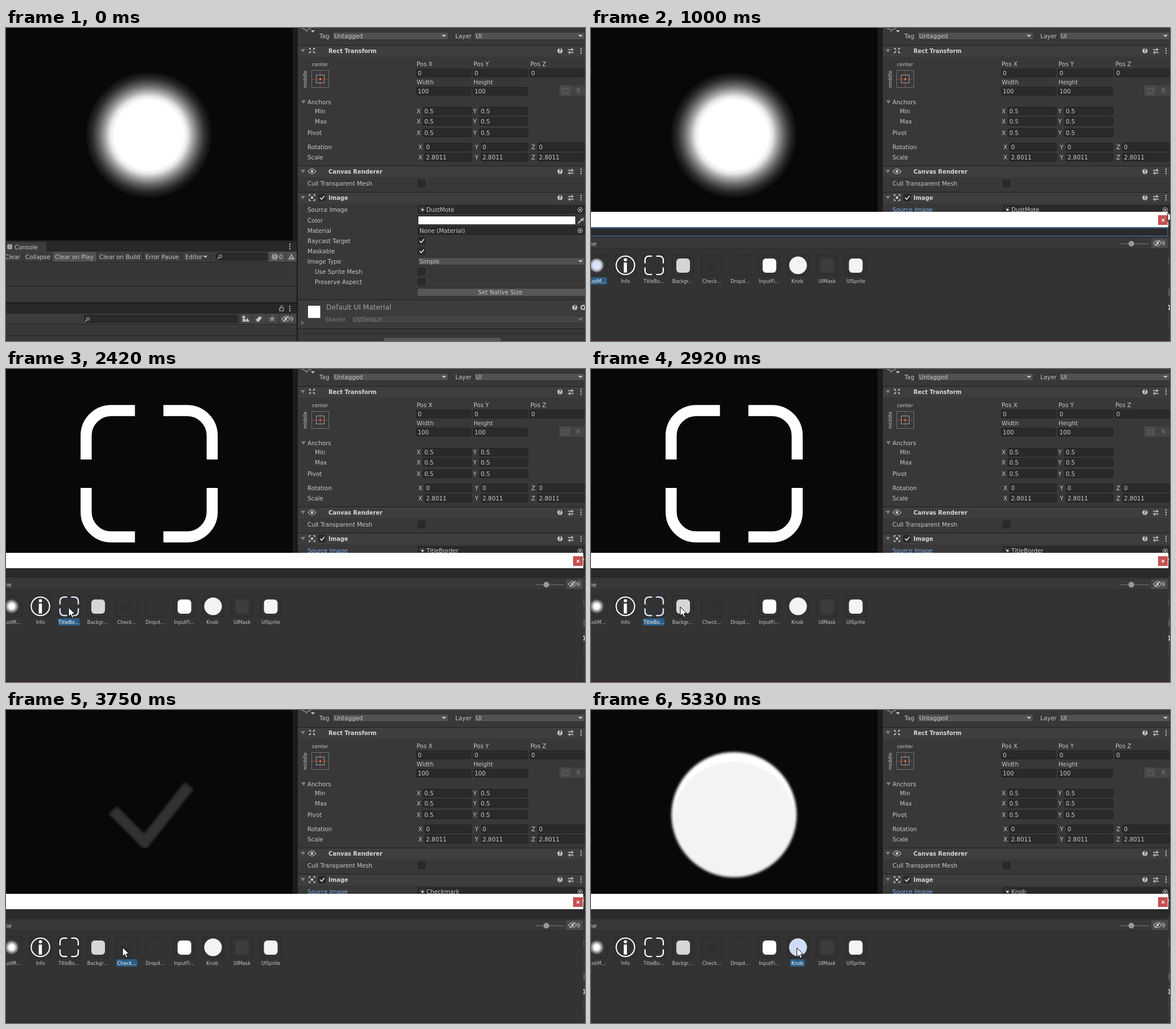
An HTML page for the animation above (5.41 s loop, 1018 by 550 pixels).

```html
<!DOCTYPE html>
<html lang="en">
<head>
<meta charset="utf-8">
<title>Sprite picker</title>
<style>
html, body { margin: 0; width: 100%; height: 100%; overflow: hidden; background: #383838; }
svg { display: block; width: 1018px; height: 550px; }
text { font: 10.3px "DejaVu Sans", sans-serif; fill: #c8c8c8; white-space: pre; }
.b { font-weight: bold; font-size: 9.9px; fill: #d6d6d6; }
.s { font-size: 8.8px; }
.c { font-size: 8.3px; text-anchor: middle; }
.m { text-anchor: middle; }
.big { font-size: 12.2px; fill: #a2a2a2; }
.dim { fill: #7a7a7a; }
.blue { fill: #7fadee; }
.on { fill: #fff; }
.state, .pop, .lower { animation: 5410ms step-end infinite; }
.pop { animation-name: pop; }
.lower { animation-name: lower; }
.cursor { animation: cursor 5410ms step-end infinite; }
@keyframes pop { 0% { opacity: 0 } 12.2%, 100% { opacity: 1 } }
@keyframes lower {
  0% { transform: translateY(0) }
  44.55% { transform: translateY(-18px) }
  69.2% { transform: translateY(4px) }
  81.5% { transform: translateY(-14px) }
  93.8%, 100% { transform: translateY(4px) }
}
@keyframes cursor {
  0% { transform: translate(1040px, 352px) }
  1.4% { transform: translate(1016px, 354px); animation-timing-function: steps(6) }
  10.65% { transform: translate(1015px, 326px) }
  12.2% { transform: translate(1014px, 324px) }
  18.35% { transform: translate(1014px, 324px); animation-timing-function: steps(2) }
  21.4% { transform: translate(477px, 456px); animation-timing-function: steps(6) }
  30.65% { transform: translate(64px, 422px) }
  33.75% { transform: translate(62px, 422px); animation-timing-function: steps(5) }
  41.45% { transform: translate(110px, 419px) }
  44.55% { transform: translate(110px, 419px); animation-timing-function: steps(4) }
  50.7% { transform: translate(157px, 418px) }
  56.85% { transform: translate(157px, 418px); animation-timing-function: steps(5) }
  64.55% { transform: translate(205px, 417px) }
  69.2% { transform: translate(205px, 417px); animation-timing-function: steps(8) }
  81.5% { transform: translate(302px, 421px); animation-timing-function: steps(8) }
  93.8% { transform: translate(353px, 420px); animation-timing-function: steps(3) }
  98.45%, 100% { transform: translate(362px, 418px) }
}
</style>
</head>
<body>
<svg id="stage" viewBox="0 0 1018 550"></svg>
<script>
const rect = (x, y, w, h, fill, more = '') =>
  `<rect x="${x}" y="${y}" width="${w}" height="${h}" fill="${fill}" ${more}/>`;
const circ = (x, y, r, fill, more = '') =>
  `<circle cx="${x}" cy="${y}" r="${r}" fill="${fill}" ${more}/>`;
const path = (d, fill, more = '') => `<path d="${d}" fill="${fill}" ${more}/>`;
const line = (d, color = '#c4c4c4', w = 1) => path(d, 'none', `stroke="${color}" stroke-width="${w}"`);
const text = (x, y, str, cls = '') => `<text x="${x}" y="${y + 3.8}" class="${cls}">${str}</text>`;
const group = (cls, body) => `<g class="${cls}">${body}</g>`;

// Editor widgets; y is the middle of the row
const field = (x, y, w, str = '') =>
  rect(x + .5, y - 7, w - 1, 14, '#2a2a2a', 'stroke="#202020" rx="2"') + text(x + 3, y, str);
const drop = (x, y, w, str, cls = '', fill = '#515151') =>
  rect(x + .5, y - 6.5, w - 1, 13, fill, 'stroke="#303030" rx="2"') + text(x + 3, y, str, cls) +
  path(`M${x + w - 12} ${y - 2}h8l-4 4z`, cls ? '#777' : '#c4c4c4');
const check = (x, y, on) =>
  rect(x + .5, y - 6, 12, 12, '#2a2a2a', 'stroke="#202020" rx="2"') +
  (on ? line(`M${x + 3} ${y}l3 3 5-6`, '#e0e0e0', 1.7) : '');
const fold = (x, y, fill = '#7d7d7d') => path(`M${x} ${y - 3}h8l-4 6z`, fill);
const dots = (x, y) => [-4, 0, 4].map(d => circ(x, y + d, 1.2, '#c4c4c4')).join('');
const help = (x, y) => circ(x, y, 4.6, '#c4c4c4') +
  `<text x="${x}" y="${y + 3}" class="c b" style="fill:#383838;font-size:8px">?</text>`;
const sliders = (x, y) => line(`M${x - 5} ${y - 2}h10M${x - 5} ${y + 3}h10M${x + 2} ${y - 5}v6M${x - 2} ${y}v6`, '#c4c4c4', 1.3);
const lens = (x, y) => circ(x, y, 2.4, 'none', 'stroke="#c4c4c4"') + line(`M${x - 2} ${y + 2}l-3 3`, '#c4c4c4', 1.3);
const eye = (x, y, off) => path(`M${x - 7} ${y}q7-9 14 0q-7 9-14 0z`, 'none', 'stroke="#c4c4c4" stroke-width="1.2"') +
  circ(x, y, 2.4, '#c4c4c4') + (off ? line(`M${x - 5} ${y + 5}l10-10`, '#c4c4c4', 1.4) : '');
const head = (y, title, tx = 567) => rect(513, y - 10, 505, 20, '#3e3e3e') + rect(513, y - 10, 505, 1, '#1f1f1f') +
  fold(518, y) + text(tx, y, title, 'b') + help(974, y) + sliders(993, y) + dots(1011, y);
const pair = (y, x, w, vals) => vals.map((v, i) => {
  const px = x + i * 99.3;
  return text(px, y, 'XYZ'[i]) + field(px + 10.5, y, w, v);
}).join('');
const frame = (x, y) => line(`M${x} ${y + 3}v-3h3m4 0h3v3m0 4v3h-3m-4 0h-3v-3`, '#c4c4c4', 1.3) +
  rect(x + 3, y + 3, 4, 4, '#c4c4c4');

// Sprites in unit scale: 241 px square centred on 0,0
const brackets = (x, y, s, w, color) => `<g transform="translate(${x} ${y}) scale(${s})">` +
  ['1 1', '-1 1', '1 -1', '-1 -1'].map(k =>
    `<path transform="scale(${k})" d="M-110.8-25V-67a44 44 0 0 1 44-44H-25" fill="none" stroke="${color}" stroke-width="${w}"/>`).join('') + '</g>';
const info = (x, y, s, color) => `<g transform="translate(${x} ${y}) scale(${s})">` +
  circ(0, 0, 115.7, 'none', `stroke="${color}" stroke-width="${s < 1 ? 15 : 10}"`) +
  `<ellipse cy="-69.5" rx="21" ry="20" fill="${color}"/>` + rect(-20.5, -35, 39.5, 126, color) + '</g>';
const panel = fill => rect(128.5, 61, 247, 246, fill, 'rx="9" stroke="#8c8c8c" stroke-width="1.4"');

const sprites = [
  circ(251, 188, 110, 'url(#glow)'),
  info(251.5, 184, 1, '#fff'),
  brackets(251.7, 184, 1, 19.5, '#fff'),
  panel('#cfcfcf'),
  path('M188 176L244 232L322 133', 'none', 'stroke="#303030" stroke-width="20" filter="url(#soft)"'),
  panel('#fff') + rect(133, 61.5, 238, 1.5, '#c4c4c4', 'rx="1"'),
  `<g filter="url(#soft)">${circ(251.5, 184, 110, '#fff')}<ellipse cx="251.5" cy="192" rx="107" ry="101" fill="#f3f3f3"/></g>`
];

const tile = (x, fill) => rect(x - 12, 405, 24, 25, fill, 'rx="6"');
const thumbs = [
  c => circ(10, 417, 13, c ? 'url(#moteBlue)' : 'url(#mote)'),
  c => info(60.5, 417, .14, c || '#fff'),
  c => brackets(111, 417, .145, 16, c || '#fff'),
  c => tile(162, c || '#d6d6d6'),
  () => line('M204 416l7 7 10-13', '#2c2c2c', 2.5),
  c => tile(313.7, c || '#fff'),
  c => circ(364, 417, 15.5, c || '#f3f3f3')
];
const names = ['DustMote', 'Info', 'TitleBorder', 'Background', 'Checkmark', 'InputFieldBackground', 'Knob'];
const labels = [[9, 'DustM...', 38], [60.5, 'Info', 21], [110.5, 'TitleBo...', 38], [160.7, 'Backgr...', 39],
  [212.5, 'Check...', 37], [313.3, 'InputFi...', 41], [362.8, 'Knob', 26],
  [262, 'Dropd...', 0], [415, 'UIMask', 0], [465.5, 'UISprite', 0]];

// One visibility window per chosen sprite, in percent of the loop
const cuts = [0, 33.75, 44.55, 56.85, 69.2, 81.5, 93.8];
const css = cuts.map((from, i) => {
  const to = cuts[i + 1];
  return `@keyframes pick${i}{${i ? '0%{opacity:0}' : ''}${from}%{opacity:1}` +
    (to ? `${to}%,100%{opacity:0}}` : '100%{opacity:1}}') + `.pick${i}{animation-name:pick${i}}`;
}).join('\n');
document.head.appendChild(document.createElement('style')).textContent = css;

const stops = list => list.map(([o, c]) => `<stop offset="${o}" stop-color="${c}"/>`).join('');
const mote = (id, c) => `<radialGradient id="${id}"><stop offset=".35" stop-color="${c}"/><stop offset="1" stop-color="${c}" stop-opacity="0"/></radialGradient>`;
const defs = `<defs><radialGradient id="glow">${stops([[.55, '#fff'], [.62, '#e6e6e6'], [.7, '#a6a6a6'],
  [.8, '#626262'], [.9, '#2c2c2c'], [.98, '#121212'], [1, '#141414']])}</radialGradient>
  ${mote('mote', '#fff')}${mote('moteBlue', '#dbe7ff')}
  <filter id="soft"><feGaussianBlur stdDeviation="2"/></filter></defs>`;

const game = rect(0, 0, 511, 375, '#1c1c1c') + rect(0, 0, 504, 373, '#080808');

const consolePane = rect(0, 374, 511, 19, '#282828') + rect(0, 376, 71, 17, '#3c3c3c') +
  rect(2.5, 380.5, 8, 8, '#c4c4c4', 'rx="1"') + line('M4 383h5M4 386h5', '#383838') + text(15, 385, 'Console') + dots(499, 384) +
  rect(0, 393, 511, 18, '#3c3c3c') + rect(82, 393, 77, 18, '#505050') +
  [29, 81, 159, 241, 309, 359].map(x => rect(x, 393, 1, 18, '#2a2a2a')).join('') +
  [[-2, 'Clear'], [34, 'Collapse'], [86, 'Clear on Play'], [164, 'Clear on Build'], [245, 'Error Pause'], [315, 'Editor']]
    .map(([x, s]) => text(x, 402, s)).join('') + path('M347 400h7l-3.5 4z', '#c4c4c4') +
  rect(369.5, 395.5, 90, 13, '#2a2a2a', 'rx="4" stroke="#202020"') + lens(377, 401) +
  rect(462, 393, 29, 18, '#505050') + rect(493, 393, 18, 18, '#505050') +
  circ(472.5, 402, 5.5, '#9a9a9a') + line('M472.5 398.5v4m0 1.5v1.5', '#505050', 1.6) + text(480, 402, '0') +
  path('M502 396l6 11h-12z', '#9a9a9a') + line('M502 400v4m0 1v1', '#505050', 1.3) +
  rect(0, 411, 511, 43, '#373737') + rect(0, 411, 511, 1, '#232323') + rect(0, 453, 511, 1, '#202020') +
  rect(0, 482, 511, 20, '#282828') + rect(0, 482, 511, 2, '#191919') +
  rect(481, 492, 7, 5, 'none', 'stroke="#c4c4c4"') + line('M483 492v-2a2 2 0 0 1 4 0', '#c4c4c4') + dots(499, 493) +
  rect(0, 502, 511, 18, '#3c3c3c') + rect(137.5, 504.5, 270, 13, '#2a2a2a', 'rx="4" stroke="#202020"') + lens(144, 511) +
  rect(411, 502, 99, 18, '#464646') + [411, 433, 456, 480].map(x => rect(x, 502, 1, 18, '#303030')).join('') +
  circ(418, 508, 2.5, '#c4c4c4') + rect(416, 511, 5, 5, '#c4c4c4') + path('M424 509l4 7h-7z', '#c4c4c4') +
  path('M439 513l6-6h4v4l-6 6z', '#c4c4c4') +
  path('M468 505l1.6 4 4.3.2-3.4 2.6 1.2 4.2-3.7-2.4-3.7 2.4 1.2-4.2-3.4-2.6 4.3-.2z', '#8c8c8c') +
  eye(492, 511, true) + text(499, 511, '9') +
  rect(0, 520, 511, 1, '#232323') + rect(0, 540, 511, 1, '#232323');

const transform = line('M520 0l8 4 9-4m-9 4v3', '#9a9a9a', 1.3) + path('M536 4h7l-3.5 4z', '#c4c4c4') +
  text(551, 14, 'Tag') + drop(574, 14, 204, 'Untagged') + text(790, 14, 'Layer') + drop(823, 14, 195, 'UI') +
  head(40, 'Rect Transform') + line('M533 35l3 3m4 0l3-3m-10 9l3-3m4 0l3 3', '#c4c4c4', 2) +
  text(538, 63, 'center', 's') + '<text transform="translate(529 105) rotate(-90)" class="s">middle</text>' +
  rect(537.5, 74.5, 30, 30, 'none', 'stroke="#707070"') + line('M552.5 75v30M538 90h30', '#9c3c38') +
  rect(545.5, 82.5, 14, 14, 'none', 'stroke="#a0a0a0"') + circ(552.5, 90, 1.6, '#f08a3c') +
  ['X', 'Y', 'Z'].map((s, i) => text(722 + 100 * i, 63, 'Pos ' + s) + field(721 + 99.7 * i, 79, 97, '0')).join('') +
  text(722, 95, 'Width') + text(822, 95, 'Height') + field(721, 111, 97, '100') + field(820.7, 111, 97, '100') +
  rect(973, 101, 21, 18, '#4a4a4a') + rect(995, 101, 23, 18, '#444') +
  rect(979.5, 106.5, 9, 8, 'none', 'stroke="#777" stroke-dasharray="2 1.5"') + text(1003, 110, 'R', 'dim') +
  fold(519, 130) + text(530, 130, 'Anchors') + text(543, 146, 'Min') + text(543, 164, 'Max') + text(530, 184, 'Pivot') +
  [146, 164, 184].map(y => pair(y, 722, 86.5, ['0.5', '0.5'])).join('') +
  text(530, 209, 'Rotation') + pair(209, 725, 83.5, ['0', '0', '0']) +
  text(530, 227, 'Scale') + pair(227, 725, 83.5, ['2.8011', '2.8011', '2.8011']);

const image = head(252, 'Canvas Renderer') + eye(538, 252) + text(530, 273, 'Cull Transparent Mesh') + check(724, 273) +
  head(298, 'Image') + frame(533, 293) + check(549, 298, true) +
  text(530, 319, 'Source Image') + field(724, 319, 296) + circ(1009.5, 319.5, 4, 'none', 'stroke="#c4c4c4"') + circ(1009.5, 319.5, 1.7, '#c4c4c4') +
  rect(728.5, 315.5, 7, 7, 'none', 'stroke="#777" stroke-dasharray="2 3"') + rect(730.5, 317.5, 3.5, 3.5, '#e0e0e0') +
  text(530, 338, 'Color') + rect(724.5, 330.5, 277, 15, '#fff', 'stroke="#202020"') +
  line('M1006 343l6-6m-1-2l4 4m-2-2l3-3', '#c4c4c4', 1.8) +
  text(530, 356, 'Material') + field(724, 356, 296, 'None (Material)') + circ(1009.5, 356, 4, 'none', 'stroke="#c4c4c4"') + circ(1009.5, 356, 1.7, '#c4c4c4') +
  text(530, 374, 'Raycast Target') + check(724, 374, true) + text(530, 392, 'Maskable') + check(724, 392, true) +
  text(530, 410, 'Image Type') + drop(724, 410, 294, 'Simple') +
  text(543, 428, 'Use Sprite Mesh') + check(724, 428) + text(543, 446, 'Preserve Aspect') + check(724, 446);

const lower = group('lower', rect(723, 457.5, 300, 14, '#585858', 'stroke="#303030" rx="2"') + text(869, 464.5, 'Set Native Size', 'm') +
  rect(513, 477, 505, 51, '#3c3c3c') + rect(513, 477, 505, 1, '#1f1f1f') + rect(531, 488, 21.5, 21.5, '#fff') +
  text(563, 491.5, 'Default UI Material', 'big') + help(1000, 491) +
  circ(1014.5, 491, 3.2, 'none', 'stroke="#c4c4c4" stroke-width="2"') + circ(1014.5, 491, 4.6, 'none', 'stroke="#c4c4c4" stroke-dasharray="1.8 1.8"') +
  text(561, 512, 'Shader', 'dim') + drop(607, 512, 411, 'UI/Default', 'dim', '#444') + path('M519 514l6 4-6 4z', '#666') +
  rect(513, 528, 505, 1, '#1f1f1f') + rect(513, 537, 505, 1, '#2a2a2a')) +
  rect(665, 544.5, 205, 8, '#585858', 'rx="2"');

const choice = names.map((n, i) => group('state pick' + i, sprites[i] + text(739, 319.5, n))).join('');

const picked = names.map((n, i) => {
  const [x, s, w] = labels[i];
  return group('state pick' + i, rect(x - w / 2, 438, w, 13, '#2c5d87', 'rx="2"') + text(x, 444.3, s, 'c on') +
    thumbs[i]('#d0ddf6') + (i ? '' : rect(-2, 351.5, 1016, 14, 'none', 'stroke="#3a79bb"')));
}).join('');

const picker = group('pop', rect(529, 313, 80, 10, '#383838') + text(530, 319, 'Source Image', 'blue') +
  rect(0, 323, 1015, 27, '#fff') + rect(997, 329, 17, 17, '#c75050') + line('M1003.5 335.5l4.5 4.5m0-4.5l-4.5 4.5', '#fff', 1.3) +
  rect(0, 350, 1015, 200, '#333') + rect(0, 350, 1015, 19, '#383838') + rect(-2, 351.5, 1016, 14, '#2a2a2a', 'stroke="#1e1e1e"') +
  rect(0, 369, 1015, 19, '#383838') + rect(0, 368, 1015, 1, '#2a2a2a') + rect(0, 387.5, 1015, 1, '#2a2a2a') +
  text(-3, 379, 'ne') + rect(931, 378.5, 50, 1.5, '#666') + circ(950, 379, 5, '#999') +
  rect(985, 369, 29, 18, '#4a4a4a') + eye(996, 378, true) + text(1003, 378, '9') +
  Array.from({ length: 10 }, (_, i) => rect(-8.5 + i * 50.6, 398.5, 37, 37, '#323232', 'stroke="#292929" rx="3"')).join('') +
  thumbs.map(f => f()).join('') + tile(415, '#3d3d3d') + tile(465.5, '#f4f4f4') +
  labels.map(([x, s]) => text(x, 444.3, s, 'c')).join('') + picked + rect(0, 548, 1015, 2, '#39292d'));

const cursor = group('cursor', path('M0 0V16l3.7-3.5 2.6 5.8 2.6-1.1-2.5-5.7H11.5z', '#fff', 'stroke="#000" stroke-width="1"'));

document.getElementById('stage').innerHTML = defs + rect(0, 0, 1018, 550, '#383838') + game + consolePane +
  rect(511, 0, 2, 550, '#191919') + transform + image + lower + choice + picker + cursor;
</script>
</body>
</html>
```
